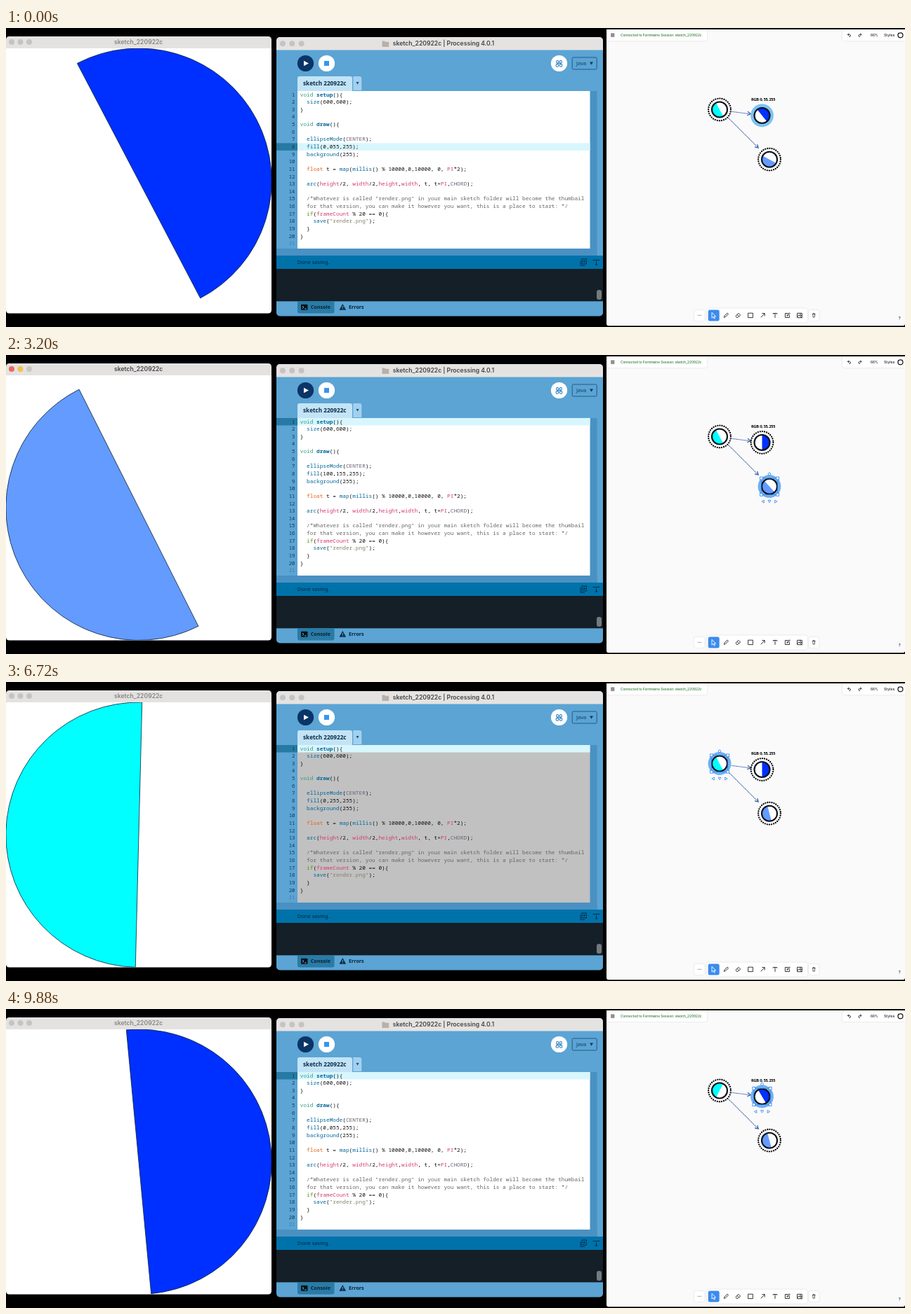
Animation, 1280 px wide and 427 px high, one loop 9.92 s. Source, as an HTML page:

```html
<!DOCTYPE html>
<html lang="en">
<head>
<meta charset="utf-8">
<title>Sketch versions</title>
<style>
  html, body { margin: 0; width: 100%; height: 100%; overflow: hidden; background: #000; }
  svg { display: block; width: 100%; height: 100%; }
  text { white-space: pre; }
  .title { font: 600 8.6px Inter, sans-serif; fill: #444; text-anchor: middle; }
  .ui { font-family: "Noto Sans", sans-serif; }
  .code, .num { font: 7.75px "Noto Sans Mono", monospace; fill: #111; }
  .num { fill: #0b3c5d; font-size: 7.3px; text-anchor: end; }
  .kw { fill: #33997e; } .fn { fill: #006699; } .main { fill: #006699; font-weight: 700; }
  .type { fill: #e2661a; } .var { fill: #d33b72; } .const { fill: #6c6478; }
  .if { fill: #5f8f10; } .str { fill: #82826c; } .note { fill: #666; }
  .board { font-family: Inter, sans-serif; fill: #222; }
  .icon { fill: none; stroke: #222; stroke-width: .9; stroke-linecap: round; stroke-linejoin: round; }
  .card { fill: #fff; filter: drop-shadow(0 0 1px #0002); }
  .link { fill: none; stroke: #3557a8; stroke-width: 1.1; }
  .handles { fill: #fff; stroke: #2f80ed; stroke-width: .8; }
</style>
</head>
<body>
<svg viewBox="0 0 1280 427" preserveAspectRatio="none">
  <rect width="1280" height="427" fill="#000"/>
  <defs>
    <clipPath id="sketchClip"><rect y="12" width="378" height="395.5" rx="4.5"/></clipPath>
    <clipPath id="editorClip"><rect x="385" y="13" width="465" height="398.5" rx="5"/></clipPath>
  </defs>

  <g id="sketch" clip-path="url(#sketchClip)">
    <rect id="canvas" y="28" width="378" height="380"/>
    <path id="arc" stroke="#062038" stroke-width=".8"/>
    <rect y="12" width="378" height="17" fill="#e4e2e1"/>
    <g id="lights"><circle cx="8" cy="20" r="4"/><circle cx="20.5" cy="20" r="4"/><circle cx="33" cy="20" r="4"/></g>
    <text id="sketchTitle" class="title" x="188.7" y="23">sketch_220922c</text>
  </g>

  <g clip-path="url(#editorClip)">
    <rect x="385" y="13" width="465" height="399" fill="#5ba4d4"/>
    <rect x="385" y="13" width="465" height="18.5" fill="#e5e3e2"/>
    <g fill="#c6c4c3"><circle cx="394" cy="22.3" r="4"/><circle cx="407.3" cy="22.3" r="4"/><circle cx="420.6" cy="22.3" r="4"/></g>
    <path d="M535.5 18.5h3.5l1 1.3h5.2v7.2h-9.7z" fill="#b9b0a8"/>
    <text class="title" x="623" y="25.3">sketch_220922c | Processing 4.0.1</text>

    <circle cx="426.5" cy="50.5" r="11.6" fill="#0b3467"/>
    <path d="M424 46.7l7 3.8-7 3.8z" fill="#fff"/>
    <circle cx="456.5" cy="50.5" r="11.6" fill="#fff"/>
    <rect x="453" y="47" width="7" height="7" fill="#3596ee"/>
    <circle cx="787.5" cy="50.5" r="11.6" fill="#fff"/>
    <g fill="none" stroke="#2b7fc0" stroke-width="1.1">
      <rect x="783.7" y="46.5" width="3" height="3.6" rx="1.2"/><rect x="788.3" y="46.5" width="3" height="3.6" rx="1.2"/>
      <rect x="783.2" y="51.6" width="3.4" height="3.6" rx="1.2"/><rect x="788.4" y="51.6" width="3.4" height="3.6" rx="1.2"/>
      <path d="M785 50.8h5"/>
    </g>
    <rect x="806.2" y="42" width="35" height="17" rx="1.5" fill="none" stroke="#1c5482" stroke-width=".9"/>
    <text class="ui" x="812" y="53.2" font-size="7.4" fill="#0d3c66">Java</text>
    <path d="M831 48.5h5l-2.5 4.3z" fill="#0d3c66"/>

    <path d="M415 90V72q0-3 3-3h72q3 0 3 3v18z" fill="#c3e4f6"/>
    <path d="M494.3 89V69h9q3 0 3 3v17z" fill="#a4d0ef"/>
    <path d="M498.5 77h4l-2 3.8z" fill="#14517e"/>
    <text class="ui" x="423" y="82" font-size="8.2" font-weight="600" fill="#0a2c49">sketch 220922c</text>

    <rect x="831" y="90" width="10.5" height="235" fill="#4a91c3"/>
    <rect x="385" y="315" width="456.5" height="10" fill="#4a91c3"/>
    <rect id="page" x="415" y="90" width="416.5" height="225"/>
    <g id="cursorLine">
      <rect x="385" y="90" width="30" height="10.5" fill="#267aa3"/>
      <rect x="415" y="90" width="416.5" height="10.5" fill="#d8f6fd"/>
    </g>
    <g id="listing"></g>

    <rect x="385" y="325" width="465" height="19" fill="#0072aa"/>
    <text id="status" class="ui" x="414.7" y="337.3" font-size="7.55" fill="#00263f">Done saving.</text>
    <g fill="none" stroke="#002f4f" stroke-width="1">
      <rect x="820" y="330" width="6.3" height="7"/><path d="M818 332v7.3h6M821.5 333.5h3.4M823.2 331.8v3.4"/>
      <path d="M835.5 331.5h10M840.5 333v6M838.7 337l1.8 2 1.8-2"/>
    </g>
    <rect x="385" y="344" width="465" height="46.3" fill="#141f27"/>
    <rect x="841" y="374" width="7" height="14" rx="3.2" fill="#747a7e"/>
    <path d="M415 390h52.5v14.5q0 3-3 3H418q-3 0-3-3z" fill="#2a7ba5"/>
    <rect x="420" y="394.8" width="9.5" height="8" rx="1" fill="#04131e"/>
    <path d="M422 397l2 1.8-2 1.8M425.2 401h2.5" fill="none" stroke="#b5dcf0" stroke-width=".8"/>
    <path d="M479.3 394l4.8 8.7h-9.6z" fill="#0a2c49"/>
    <path d="M479.3 397v2.8M479.3 400.6v1" stroke="#8cc4e8" stroke-width=".9"/>
    <g class="ui" font-size="7.2" font-weight="700" fill="#062338">
      <text x="433.7" y="401.3">Console</text><text x="488" y="401.3">Errors</text>
    </g>
  </g>

  <rect x="855" y="2" width="425" height="423.3" rx="3" fill="#fafafa"/>
  <path class="card" d="M855 2h143v13q0 3-3 3H855z"/>
  <path class="card" d="M1280 2h-89v13q0 3 3 3h86z"/>
  <path class="icon" d="M861.5 8.5h4.5M861.5 10.3h4.5M861.5 12.1h4.5" stroke-width=".6"/>
  <g class="board">
    <text x="875" y="12" font-size="4.75" font-weight="500" style="fill:#2a762c">Connected to Formtwine Session: sketch_220922c</text>
    <text x="1231" y="12.2" font-size="4.8" font-weight="500">66%</text>
    <text x="1250" y="12.2" font-size="5.2" font-weight="500">Styles</text>
    <text x="1270.5" y="417.3" font-size="6.5">?</text>
    <text x="1061" y="104.2" font-size="5.5" font-weight="700" letter-spacing="-.35" style="fill:#000;font-family:'Open Sans',sans-serif">RGB: 0, 55, 255</text>
  </g>
  <circle cx="1273.5" cy="10.3" r="3.5" fill="#fff" stroke="#111" stroke-width="1.2"/>
  <path class="icon" stroke-width=".7" d="M1200 7.8l-1.6 1.6 1.6 1.6M1198.6 9.4h2.2q1.6 0 1.6 1.6t-1.6 1.6M1216.4 7.8l1.6 1.6-1.6 1.6M1217.8 9.4h-2.2q-1.6 0-1.6 1.6t1.6 1.6"/>

  <rect class="card" x="980" y="403" width="14.5" height="15" rx="3"/>
  <rect class="card" x="998" y="400.5" width="143" height="20" rx="4"/>
  <rect class="card" x="1143" y="403" width="14.5" height="15" rx="3"/>
  <rect x="999.7" y="402.5" width="16" height="16" rx="2.5" fill="#3b8bee"/>
  <path d="M1005 406.3v7.8l2-1.6 1.4 2.6 1-.6-1.3-2.6h2.6z" fill="none" stroke="#fff" stroke-width=".9"/>
  <g class="icon">
    <path d="M1022.5 413l.6-2 4-4 1.4 1.4-4 4z"/>
    <path d="M1039.3 411l3.7-3.7 2.6 2.6-3.6 3.6h-1.2zM1041 409.4l2.6 2.6"/>
    <rect x="1057" y="407.2" width="6.4" height="6.4"/>
    <path d="M1075 413l5-5.2M1076.7 407.6h3.5v3.5M1092.3 408.4v-.9h5.4v.9M1095 407.5v6"/>
    <path d="M1113 407.5h-3.6v6h6v-3M1112 411l.3-1.3 3-3 1 1-3 3z"/>
    <rect x="1126.9" y="407.3" width="6.4" height="6.4"/><path d="M1127 412l2-2 4 3.6M1131 407.5v3h2"/>
    <path d="M1148.2 408.6h4M1148.8 408.8l.3 4.3h2.2l.3-4.3M1149.4 408v-.6h1.5v.6" stroke-width=".7"/>
    <path d="M985.3 410.3h.01M987.3 410.3h.01M989.3 410.3h.01"/>
  </g>

  <g class="link">
    <path d="M1033 119.3L1059 122.7M1028.5 128.5L1070.5 170.5" stroke-dasharray="1.4 .8"/>
    <path d="M1056 119.3l4.5 3.5-5.4 2M1069.7 166l1.6 5.3-5.3-1.4"/>
  </g>
  <g id="nodes"></g>
</svg>

<script>
const LOOP = 9920;
const DEG_PER_MS = 0.0375;
const BLUE = '#0030ff', SKY = '#649bff', CYAN = '#00ffff';
const SVG_NS = 'http://www.w3.org/2000/svg';
const $ = id => document.getElementById(id);

function add(parent, name, attrs = {}) {
  const el = parent.appendChild(document.createElementNS(SVG_NS, name));
  for (const key in attrs) el.setAttribute(key, attrs[key]);
  return el;
}

// Last value whose start time has been reached.
const at = (time, steps) => steps.reduce((value, [start, next]) => time >= start ? next : value, null);

function halfDisc(cx, cy, r, degrees) {
  const a = degrees * Math.PI / 180, dx = r * Math.cos(a), dy = r * Math.sin(a);
  return `M${cx + dx} ${cy + dy}A${r} ${r} 0 0 1 ${cx - dx} ${cy - dy}Z`;
}

const show = (el, visible) => el.style.display = visible ? '' : 'none';

// Code listing
const SOURCE = `void setup(){
  size(600,600);
}

void draw(){

  ellipseMode(CENTER);
  fill(0,055,255);
  background(255);

  float t = map(millis() % 10000,0,10000, 0, PI*2);

  arc(height/2, width/2,height,width, t, t+PI,CHORD);

  /*Whatever is called "render.png" in your main sketch folder will become the thumbail
  for that version, you can make it however you want, this is a place to start: */
  if(frameCount % 20 == 0){
    save("render.png");
  }
}
`.split('\n');

const SYNTAX = [
  ['kw', /^void$/], ['main', /^(setup|draw)$/], ['type', /^float$/], ['if', /^if$/],
  ['fn', /^(size|ellipseMode|fill|background|map|millis|arc|save)$/],
  ['var', /^(height|width|frameCount|PI)$/], ['const', /^(CENTER|CHORD)$/], ['str', /^"/],
];

function highlight(line) {
  return line.replace(/"[^"]*"|[A-Za-z]+/g, word => {
    const rule = SYNTAX.find(([, pattern]) => pattern.test(word));
    return rule ? `<tspan class="${rule[0]}">${word}</tspan>` : word;
  });
}

const LINE_HEIGHT = 10.63;
const codeLines = SOURCE.map((line, i) => {
  const y = 97.6 + i * LINE_HEIGHT;
  const number = add($('listing'), 'text', { class: 'num', x: 411.5, y, opacity: i === 20 ? 0.35 : 1 });
  number.textContent = i + 1;
  const isNote = i === 14 || i === 15;
  const text = add($('listing'), 'text', { class: isNote ? 'code note' : 'code', x: 418.8, y });
  text.innerHTML = isNote ? line : highlight(line);
  return text;
});

// Version nodes
function makeNode(x, y, fill) {
  const g = add($('nodes'), 'g', { transform: `translate(${x} ${y})` });
  const halo = add(g, 'circle', { r: 16.4, fill: '#78b9f0' });
  const dots = add(g, 'circle', {
    r: 15.9, fill: 'none', stroke: '#000', 'stroke-width': 2.3,
    'stroke-linecap': 'round', 'stroke-dasharray': '0 3.12',
  });
  add(g, 'circle', { r: 11, fill: '#fff' });
  const half = add(g, 'path', { fill });
  add(g, 'circle', { r: 11, fill: 'none', stroke: '#0a0f18', 'stroke-width': 2.1 });
  const handles = add(g, 'g', { class: 'handles' });
  add(handles, 'rect', { x: -11.7, y: -11.7, width: 23.4, height: 23.4, fill: 'none' });
  for (const hx of [-11.7, 11.7]) for (const hy of [-11.7, 11.7])
    add(handles, 'rect', { x: hx - 1.9, y: hy - 1.9, width: 3.8, height: 3.8 });
  add(handles, 'circle', { cy: -17.7, r: 1.8 });
  add(handles, 'path', { d: 'M-7.7 19.5v4l-3.4-2zM-2 19.7h4l-2 3.5zM7.7 19.5v4l3.4-2z' });
  return { halo, dots, half, handles };
}

const nodes = {
  cyan: makeNode(1016, 116.5, CYAN),
  blue: makeNode(1076.5, 125, BLUE),
  sky: makeNode(1087, 187.7, SKY),
};

// Timeline: each run opens a window, starts drawing, loses focus and closes.
const RUNS = [
  { open: 0, draw: 0, blur: 0, close: 1000, zero: -6463, fill: BLUE },
  { open: 1600, draw: 1805, blur: 3500, close: 3850, zero: 1512, fill: SKY },
  { open: 4350, draw: 4573, blur: 6300, close: 7500, zero: 4283, fill: CYAN },
  { open: 8080, draw: 8310, blur: 9200, close: 9200, zero: 8020, fill: BLUE },
  { open: 9200, draw: 9200, blur: 9200, close: LOOP, zero: 2824, fill: BLUE },
];
const FILL_ARGS = [[0, '0,055,255'], [1150, '100,155,255'], [3950, '0,255,255'], [7650, '0,055,255']];
const PAGE = [[0, '#fff'], [3950, '#c1c1c1'], [7650, '#fff']];
const SAVED = [[0, true], [1500, false], [2145, true], [4200, false], [4913, true], [8000, false], [8650, true]];
const CURRENT = [[0, 'blue'], [1200, 'sky'], [4000, 'cyan'], [8500, 'blue']];
const SELECTED = [[0, ''], [900, 'sky'], [3750, 'cyan'], [7450, 'blue']];
const THUMBS = {
  cyan: [[0, 62], [7300, 118]],
  blue: [[0, 231], [800, 270], [9200, 240]],
  sky: [[0, 28], [2900, 48], [3550, 75]],
};

function drawSketch(time) {
  const run = RUNS.find(r => time >= r.open && time < r.close);
  show($('sketch'), run);
  if (!run) return;
  const drawing = time >= run.draw, active = time < run.blur;
  $('canvas').setAttribute('fill', drawing ? '#fff' : '#cdcecf');
  show($('arc'), drawing);
  $('arc').setAttribute('fill', run.fill);
  $('arc').setAttribute('d', halfDisc(189, 218.2, 189.2, (time - run.zero) * DEG_PER_MS));
  const colors = active ? ['#ec6a5e', '#f4bf4f', '#c9c7c6'] : Array(3).fill('#c6c4c3');
  colors.forEach((color, i) => $('lights').children[i].setAttribute('fill', color));
  $('sketchTitle').style.fill = active ? '#444' : '#858483';
}

let shownArgs = '';
function drawEditor(time) {
  const args = at(time, FILL_ARGS);
  if (args !== shownArgs) {
    codeLines[7].innerHTML = highlight(`  fill(${args});`);
    shownArgs = args;
  }
  $('page').setAttribute('fill', at(time, PAGE));
  const line = time < 1150 ? 7 : 0;
  $('cursorLine').setAttribute('transform', `translate(0 ${line * LINE_HEIGHT})`);
  show($('status'), at(time, SAVED));
}

function drawNodes(time) {
  const current = at(time, CURRENT), selected = at(time, SELECTED);
  for (const [name, node] of Object.entries(nodes)) {
    show(node.halo, name === current);
    show(node.dots, name !== current);
    show(node.handles, name === selected);
    node.halo.setAttribute('fill', name === selected ? '#6fb0f2' : '#7cc3f2');
    node.half.setAttribute('d', halfDisc(0, 0, 10.5, at(time, THUMBS[name])));
  }
}

const startTime = performance.now();
function frame() {
  const time = (performance.now() - startTime) % LOOP;
  drawSketch(time);
  drawEditor(time);
  drawNodes(time);
  requestAnimationFrame(frame);
}
frame();
</script>
</body>
</html>
```
